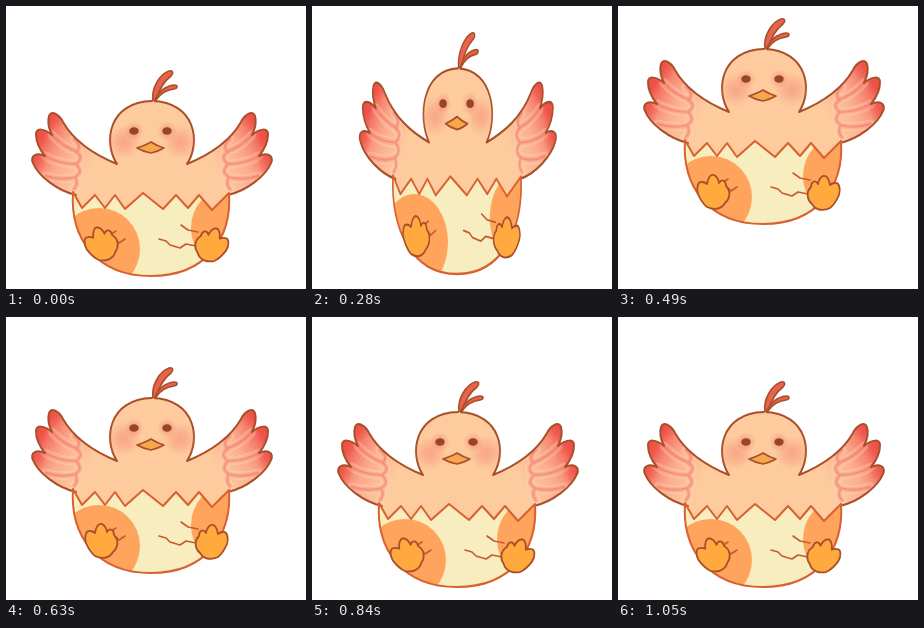
Recreate the animation shown at these times as an HTML page with a canvas. Size 300 by 283 pixels, loop 1120 ms.

```html
<!DOCTYPE html>
<html lang="en">
<head>
<meta charset="utf-8">
<title>Hatching chick</title>
<style>
html, body { margin: 0; width: 100%; height: 100%; overflow: hidden; background: #fff; }
canvas { display: block; width: 300px; height: 283px; }
</style>
</head>
<body>
<canvas id="stage" width="300" height="283"></canvas>
<script>
const ctx = document.getElementById('stage').getContext('2d');
const STEP = 70, STEPS = 16, MID = 146;
const SKIN = '#fdcb9e', BROWN = '#a9502b', RUST = '#d9602f';

// step, width scale, height scale, bottom edge
const poses = [
  [0, 1, 1, 270], [2, 1.14, .86, 272], [4, .82, 1.175, 268],
  [6, 1, 1, 210], [7, 1, 1, 218], [8, 1, 1, 232], [9, 1, 1, 256],
  [10, 1.125, .87, 273], [12, 1, 1, 270], [13, .98, 1.02, 270], [15, 1, 1, 270]
];

const outline = new Path2D(
  'M146 95C190 96 195 137 181 158C203 149 223 137 235 116C239 108 247 104 249 110' +
  'C251 117 249 123 246 129C254 122 262 122 262 128C262 137 258 144 253 150' +
  'C262 146 268 150 265 157C260 170 240 185 222 189');
const half = new Path2D(outline);
half.lineTo(219, 205);
half.lineTo(144, 206);
half.lineTo(144, 95);
const feathers = new Path2D(
  'M246 129Q235 141 220 146M253 150Q239 158 222 158M224 133q-9 7 -2 13q-9 5 0 12q-8 8 1 13q-4 7 1 12M222 171q14 4 30 -1');
const zigzag = 'M67 186L76 202L89 189L99 202L109 189L119 203L137 187L157 203L170 189L182 202L193 189L206 204L223 187';
const egg = new Path2D(zigzag + 'C226 231 201 270 145 270C89 270 64 231 67 186Z');
const foot = new Path2D(
  'M-15 2C-17 -4 -15 -11 -11 -10Q-8 -10 -6 -8C-5 -15 -2 -18 1 -17Q5 -15 6 -9C9 -14 13 -11 13 -6C19 0 16 8 12 11C8 18 0 18 -6 15C-10 12 -12 9 -15 2Z');
const cracks = new Path2D(
  'M103 238L110 234L113 237L119 233M104 229L110 225M153 233L160 235L164 239L174 242L180 238L190 240M175 219L182 224L192 226');
const crest = [
  new Path2D('M147 95C145 82 154 68 163 65C167 64 168 67 165 70C157 76 153 84 150 94Z'),
  new Path2D('M149 94C152 86 159 80 168 79C172 79 172 82 168 83C160 84 154 88 150 94Z')
];
const beak = new Path2D('M131 142Q140 139 145 136Q151 140 158 142Q151 146 145 147Q138 146 131 142Z');

function shape(path, fill, line, width = 2) {
  ctx.fillStyle = fill;
  ctx.fill(path);
  stroke(path, line, width);
}

function stroke(path, line, width) {
  ctx.strokeStyle = line;
  ctx.lineWidth = width;
  ctx.stroke(path);
}

function oval(x, y, rx, ry, fill) {
  ctx.beginPath();
  ctx.ellipse(x, y, rx, ry, 0, 0, 7);
  ctx.fillStyle = fill;
  ctx.fill();
}

function glow(x, y, r, rgb, alpha) {
  const g = ctx.createRadialGradient(x, y, 0, x, y, r);
  g.addColorStop(0, `rgba(${rgb},${alpha})`);
  g.addColorStop(.45, `rgba(${rgb},${alpha * .65})`);
  g.addColorStop(1, `rgba(${rgb},0)`);
  oval(x, y, r, r, g);
}

function bodyHalf(side) {
  ctx.save();
  ctx.translate(MID, 0);
  ctx.scale(side, 1);
  ctx.translate(-MID, 0);
  ctx.fillStyle = SKIN;
  ctx.fill(half);
  ctx.save();
  ctx.clip(half);
  const tint = ctx.createLinearGradient(207, 160, 258, 134);
  tint.addColorStop(0, 'rgba(250,150,130,0)');
  tint.addColorStop(.5, 'rgba(250,145,125,.5)');
  tint.addColorStop(1, 'rgba(238,75,70,.9)');
  ctx.fillStyle = tint;
  ctx.fillRect(200, 95, 70, 100);
  stroke(feathers, 'rgba(255,215,185,.35)', 9);
  stroke(feathers, 'rgba(244,115,100,.25)', 5);
  stroke(feathers, 'rgba(236,100,88,.4)', 2);
  glow(247, 110, 15, '236,75,65', .65);
  glow(261, 129, 14, '236,75,65', .65);
  glow(264, 154, 14, '236,75,65', .65);
  ctx.restore();
  stroke(outline, BROWN, 2);
  ctx.restore();
}

function drawEgg() {
  ctx.fillStyle = '#f8edbf';
  ctx.fill(egg);
  ctx.save();
  ctx.clip(egg);
  oval(93, 243, 41, 41, '#ffa45c');
  oval(222, 222, 37, 40, '#ffa45c');
  ctx.restore();
  stroke(egg, RUST, 2);
  stroke(cracks, '#c75a30', 1.6);
}

function drawFoot(x, y, side, angle) {
  ctx.save();
  ctx.translate(x, y);
  ctx.scale(side, 1);
  ctx.rotate(angle);
  shape(foot, '#ffa93f', BROWN, 1.8);
  ctx.restore();
}

function drawFace() {
  for (const [eye, cheek] of [[128, 118], [161, 174]]) {
    glow(cheek, 136, 17, '248,135,115', .55);
    glow(eye, 125, 10, '240,120,95', .5);
    oval(eye, 125, 4.7, 3.8, '#984629');
  }
  shape(beak, '#f7a64c', BROWN, 1.7);
}

function poseAt(step) {
  const i = poses.findIndex(p => p[0] >= step);
  const b = poses[i], a = poses[Math.max(0, i - 1)];
  const k = b === a ? 0 : (step - a[0]) / (b[0] - a[0]);
  return a.map((v, j) => v + (b[j] - v) * k);
}

function draw(step) {
  const [, sx, sy, bottom] = poseAt(step);
  const tilt = bottom >= 269 ? -.25 : 0;
  ctx.setTransform(1, 0, 0, 1, 0, 0);
  ctx.fillStyle = '#fff';
  ctx.fillRect(0, 0, 300, 283);
  ctx.translate(145, bottom);
  ctx.scale(sx, sy);
  ctx.translate(-145, -270);
  ctx.lineJoin = ctx.lineCap = 'round';
  crest.forEach(p => shape(p, '#e8624c', BROWN, 1.6));
  bodyHalf(1);
  bodyHalf(-1);
  drawFace();
  drawEgg();
  drawFoot(95, 238, 1, tilt);
  drawFoot(206, 239, -1, tilt);
}

const start = performance.now();
function tick() {
  const time = Math.max(0, performance.now() - start);
  draw(Math.floor(time / STEP) % STEPS);
  requestAnimationFrame(tick);
}
tick();
</script>
</body>
</html>
```
